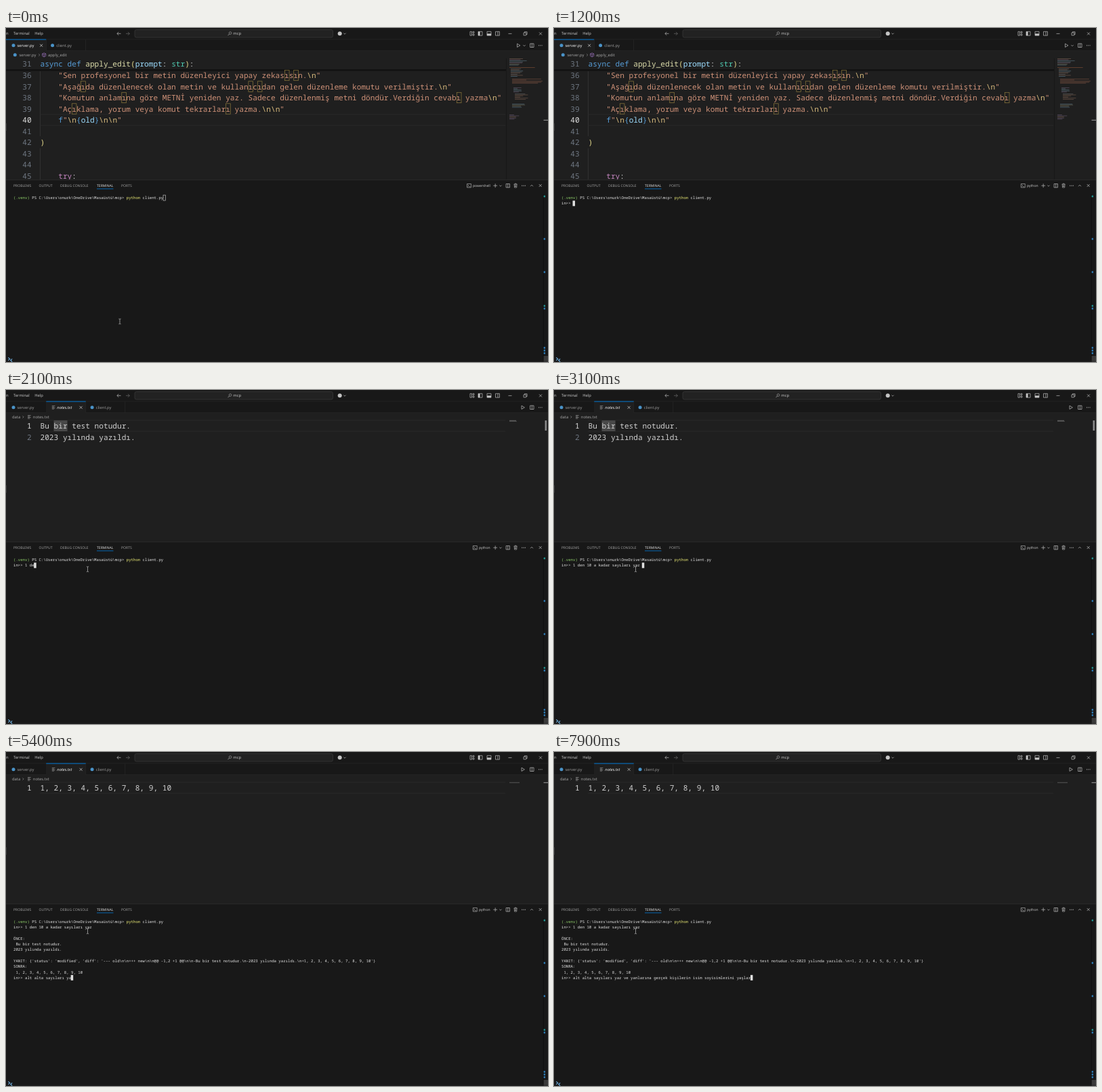
Animation of 800x494 px, one loop 8 s. Source, as an HTML page:

```html
<!DOCTYPE html>
<html lang="tr">
<head>
<meta charset="utf-8">
<title>Editor session</title>
<style>
html, body { margin: 0; width: 100%; height: 100%; overflow: hidden; background: #181818; }
svg { display: block; width: 800px; height: 494px; }
text { white-space: pre; text-rendering: geometricPrecision; }
.code { font: 11.14px "Noto Sans Mono", "DejaVu Sans Mono", monospace; }
.term { font: 500 5.68px "Noto Sans Mono", "DejaVu Sans Mono", monospace; fill: #e2e2e2; }
.ui { font: 5.85px "Open Sans", "Noto Sans", sans-serif; fill: #cccccc; }
.cap { font: 5.08px "Open Sans", "Noto Sans", sans-serif; fill: #a6a6a6; }
</style>
</head>
<body>
<svg id="stage" viewBox="0 0 800 494"></svg>
<script>
const LOOP = 8000;
const CODE_W = 6.683, CODE_X = 50.5, CODE_ROW = 16.5;
const TERM_W = 3.408, TERM_X = 11, TERM_ROW = 8.27;
const STR = '#ce9178', ESC = '#d7ba7d', KEY = '#569cd6', VAR = '#9cdcfe',
      BRACKET = '#e3d98a', PLAIN = '#d0d0d0', DIM = '#6e7681', PY = '#4a93c8';

const stage = document.getElementById('stage');

function el(tag, attrs, parent = stage) {
  const node = document.createElementNS('http://www.w3.org/2000/svg', tag);
  for (const k in attrs) node.setAttribute(k, attrs[k]);
  return parent.appendChild(node);
}
const group = (parent = stage) => el('g', {}, parent);
const rect = (x, y, width, height, fill, parent, more) =>
  el('rect', { x, y, width, height, fill, ...more }, parent);
const line = (d, parent, stroke = '#bdbdbd', w = 0.7) =>
  el('path', { d, stroke, fill: 'none', 'stroke-width': w }, parent);
const dot = (x, y, r, fill, parent) => el('circle', { cx: x, cy: y, r, fill }, parent);

// runs: a string or a list of [text, colour]
function text(cls, x, y, runs, parent, more) {
  const node = el('text', { class: cls, x, y, ...more }, parent);
  if (typeof runs === 'string') node.textContent = runs;
  else for (const [s, fill] of runs) el('tspan', { fill }, node).textContent = s;
  return node;
}
const show = (node, on) => { node.style.display = on ? '' : 'none'; };

const icon = {
  close: (x, y, p, c) => line(`M${x-2} ${y-2}l4 4m0-4l-4 4`, p, c),
  down: (x, y, p) => line(`M${x-1.6} ${y-.8}l1.6 1.6l1.6-1.6`, p),
  right: (x, y, p) => line(`M${x-.8} ${y-1.6}l1.6 1.6l-1.6 1.6`, p, '#909090'),
  dots: (x, y, p) => [-2.3, 0, 2.3].forEach(d => dot(x + d, y, .6, '#c4c4c4', p)),
  split: (x, y, p) => line(`M${x-2.7} ${y-2.7}h5.4v5.4h-5.4zM${x} ${y-2.7}v5.4`, p),
  play: (x, y, p) => line(`M${x-2} ${y-2.6}l4.4 2.6l-4.4 2.6z`, p),
  list: (x, y, p) => line(`M${x-2.3} ${y-2.2}h4.6m-4.6 1.5h3.3m-3.3 1.5h4.6m-4.6 1.5h3.3`, p, '#b0b0b0', .6),
  shell: (x, y, p) => line(`M${x-3} ${y-2.7}h6v5.4h-6zM${x-1.8} ${y-1.3}l1.4 1.3l-1.4 1.3M${x} ${y+1.5}h1.8`, p, '#c4c4c4', .6)
};

function titleBar() {
  text('ui', 0, 10.4, 'n');
  text('ui', 11, 10.4, 'Terminal');
  text('ui', 42.3, 10.4, 'Help');
  line('M169.5 8.3h-5.6m2.4-2.4l-2.4 2.4l2.4 2.4');
  line('M177 8.3h5.4m-2.4-2.4l2.4 2.4l-2.4 2.4', stage, '#6a6a6a');
  rect(190, 2.5, 292.5, 11.5, '#222222', stage, { rx: 2.5, stroke: '#3c3c3c', 'stroke-width': .7 });
  el('circle', { cx: 331, cy: 7.5, r: 1.8, fill: 'none', stroke: '#b0b0b0', 'stroke-width': .6 });
  line('M329.7 8.9l-2.2 2.2');
  text('ui', 335.3, 10.4, 'mcp');
  dot(492.7, 8.2, 3, '#c4c4c4');
  icon.down(500, 8.4);
  line('M685 5.3h2.4v5.8h-2.4zM689 5.3h2v2h-2zM689 9h2v2h-2z');
  for (const x of [697, 710, 722.5]) line(`M${x} 5.3h6v5.8h-6z`);
  rect(697, 5.3, 2.6, 5.8, '#c4c4c4');
  rect(710, 8.3, 6, 2.8, '#c4c4c4');
  line('M726 5.3v5.8');
  line('M741.5 8.4h5');
  line('M764 7h3.8v3.8h-3.8zM765.3 7v-1.3h3.8v3.8h-1.3');
  icon.close(789, 8.4);
}

function tab(x, w, name, active, parent) {
  if (active) {
    rect(x, 17, w, 16.7, '#1f1f1f', parent);
    rect(x, 16.5, w, 1, '#0078d4', parent);
    icon.close(x + w - 7.2, 25.8, parent, '#d8d8d8');
  }
  rect(x + w - .3, 17.5, .6, 16, '#2b2b2b', parent);
  const txt = name === 'notes.txt', ix = x + (x ? 9.3 : 11);
  if (txt) icon.list(ix + 1.5, 25.8, parent);
  else dot(ix, 25.8, 2.5, PY, parent);
  text('ui', x + (x ? 15 : 16.5) + (txt ? 1 : 0), 28, name, parent, {
    style: (active ? 'fill:#fff' : 'fill:#9d9d9d') + (txt ? ';font-style:italic' : '')
  });
}

const lineNo = (n, y, on, parent) =>
  text('code', 37.6, y + 4, String(n), parent, { 'text-anchor': 'end', fill: on ? '#dcdcdc' : DIM });
const currentLine = (y, parent) =>
  line(`M50 ${y-8.1}H737M50 ${y+8.1}H737`, parent, '#2c2c2c', .8);
const escapes = (s, fill) =>
  s.split(/(\\n)/).filter(Boolean).map(p => [p, p === '\\n' ? ESC : fill]);

function minimap(parent) {
  let seed = 11;
  const rnd = () => (seed = seed * 16807 % 2147483647) / 2147483647;
  // first y, rows, indent, widest row, colours
  const bands = [
    [45, 1, 0, 50, ['#94705f']],
    [46.6, 6, 0, 28, ['#8a6a80', '#6f8f9f', '#8c8c70']],
    [58, 1, 0, 50, ['#a8633f']],
    [60, 8, 2, 24, ['#7d7d7d', '#6a8fa5', '#94705f']],
    [75, 5, 4, 46, ['#a0674f', '#97604a']],
    [88, 5, 6, 12, ['#7f6a88', '#6f8f9f']],
    [97, 6, 8, 20, ['#7d7d7d', '#8c6a58']],
    [112, 4, 4, 20, ['#6a8fa5', '#8c8c70']],
    [128, 5, 0, 16, ['#7f6a88', '#94705f']]
  ];
  for (const [y, rows, indent, max, colours] of bands)
    for (let i = 0; i < rows; i++)
      rect(743 + indent, y + i * 1.6, max * (.4 + .6 * rnd()), .7,
        colours[Math.floor(rnd() * colours.length)], parent, { opacity: .65 });
}

function codeView() {
  const g = group();
  tab(0, 59.3, 'server.py', true, g);
  tab(59.3, 58, 'client.py', false, g);
  icon.play(756.5, 25.8, g);
  icon.down(765, 26, g);
  dot(13.3, 39.8, 2.5, PY, g);
  text('ui', 19.5, 42, 'server.py', g, { style: 'fill:#a9a9a9' });
  icon.right(49, 39.9, g);
  line('M53.6 38.2l2.6-1.3l2.6 1.3v3.2l-2.6 1.3l-2.6-1.3zM53.6 38.2l2.6 1.3l2.6-1.3M56.2 39.5v3.2', g, '#b180d7', .6);
  text('ui', 62, 42, 'apply_edit', g, { style: 'fill:#a9a9a9' });

  const rowY = n => 70 + (n - 36) * CODE_ROW;
  line('M50.5 63V160M50.5 178V224', g, '#3a3a3a', .7);
  rect(0, 61.2, 738, 1.6, '#101010', g);
  rect(0, 62.8, 738, 1.2, '#181818', g);
  currentLine(rowY(40), g);
  lineNo(31, 53, false, g);
  for (let n = 36; n <= 45; n++) lineNo(n, rowY(n), n === 40, g);

  text('code', CODE_X, 57, [
    ['async def ', KEY], ['apply_edit', '#dcdcaa'], ['(', BRACKET], ['prompt', VAR],
    [': ', PLAIN], ['str', '#4ec9b0'], [')', BRACKET], [':', PLAIN]
  ], g);

  const inner = CODE_X + 4 * CODE_W;
  [
    '"Sen profesyonel bir metin düzenleyici yapay zekasısın.\\n"',
    '"Aşağıda düzenlenecek olan metin ve kullanıcıdan gelen düzenleme komutu verilmiştir.\\n"',
    '"Komutun anlamına göre METNİ yeniden yaz. Sadece düzenlenmiş metni döndür.Verdiğin cevabı yazma\\n"',
    '"Açıklama, yorum veya komut tekrarları yazma.\\n\\n"'
  ].forEach((s, i) => {
    const y = rowY(36 + i);
    text('code', inner, y + 4, escapes(s, STR), g);
    [...s].forEach((c, col) => {
      if (c === 'ı')
        rect(inner + col * CODE_W, y - 7.7, CODE_W, 15.4, 'none', g, { stroke: '#8f7a3c', 'stroke-width': .7 });
    });
  });
  text('code', inner, rowY(40) + 4, [
    ['f', KEY], ['"', STR], ['\\n', ESC], ['{', KEY], ['old', VAR], ['}', KEY],
    ...escapes('\\n\\n"', STR)
  ], g);
  text('code', CODE_X, rowY(42) + 4, [[')', BRACKET]], g);
  text('code', inner, rowY(45) + 4, [['try', '#c586c0'], [':', PLAIN]], g);

  minimap(g);
  rect(738, 45, .7, 179, '#161616', g);
  rect(793.5, 135.8, 6.5, 1, '#a0a0a0', g);
  return g;
}

function notesView() {
  const g = group();
  tab(0, 59.3, 'server.py', false, g);
  tab(59.3, 58.5, 'notes.txt', true, g);
  tab(117.8, 58, 'client.py', false, g);
  icon.play(763, 25.8, g);
  text('ui', 9, 42, 'data', g, { style: 'fill:#a9a9a9' });
  icon.right(25.3, 39.9, g);
  icon.list(34.3, 39.8, g);
  text('ui', 39.8, 42, 'notes.txt', g, { style: 'fill:#a9a9a9' });
  currentLine(53, g);
  lineNo(1, 53, true, g);

  const before = group(g), after = group(g);
  rect(CODE_X + 3 * CODE_W, 45, 3 * CODE_W, 16, '#484848', before);
  text('code', CODE_X, 57, 'Bu bir test notudur.', before, { fill: PLAIN });
  lineNo(2, 69.5, false, before);
  text('code', CODE_X, 73.5, '2023 yılında yazıldı.', before, { fill: PLAIN });
  rect(743, 44.8, 10, .9, '#777777', before);
  rect(743, 46.3, 11, .7, '#555555', before);
  rect(795.5, 45, 2.6, 15, '#8a8a8a', before);
  text('code', CODE_X, 57, '1, 2, 3, 4, 5, 6, 7, 8, 9, 10', after, { fill: PLAIN });
  rect(743, 44.8, 15, .8, '#666666', after);
  rect(793.5, 44.8, 6.5, 1, '#a0a0a0', after);
  return { g, before, after };
}

function panel() {
  rect(0, 224.3, 800, 270, '#181818');
  rect(0, 224.3, 800, .9, '#2e2e2e');
  for (const [x, name] of [[11, 'PROBLEMS'], [48.5, 'OUTPUT'], [80, 'DEBUG CONSOLE'], [134, 'TERMINAL'], [170, 'PORTS']])
    text('cap', x, 235.2, name, stage, name === 'TERMINAL' ? { style: 'fill:#e6e6e6' } : {});
  rect(134, 237.5, 24.5, .8, '#0078d4');
  line('M719.3 233.2h5.8M722.2 230.3v5.8');
  icon.down(730, 233.4);
  icon.split(740.8, 233.2);
  line('M749.5 231.2h5.2M751 231.2v-1h2.2v1M750.2 231.4l.3 4.6h3.2l.3-4.6M751.5 232.5v2.5M752.7 232.5v2.5', stage, '#c4c4c4', .6);
  icon.dots(764, 233.2);
  line('M774 234.2l2-2l2 2');
  icon.close(788.7, 233);
  rect(792.8, 246, .8, 248, '#0c0c0c');
  for (const y of [249, 312, 361, 411, 415, 473, 477, 481])
    rect(793.6, y - 1.3, 2.4, 2.6, y === 249 || y === 411 ? '#22938e' : '#2f7bb4');
  rect(793.6, 485, 6.4, 9, '#3a3a3a');
  rect(0, 492.6, 800, .7, '#242424');
  line('M3.2 487.4l2.6 2.1l-2.6 2.1M9.2 489.4l-2.5 2.1l2.5 2.1', stage, '#6fb0e0', 1.1);
}

rect(0, 0, 800, 494, '#181818');
rect(0, 33.6, 800, 191, '#1f1f1f');
rect(0, 33.2, 800, .6, '#2b2b2b');
rect(0, 16.6, 800, .6, '#2b2b2b');
titleBar();
const code = codeView();
const notes = notesView();
icon.split(776.3, 25.8);
icon.dots(788.7, 25.8);
rect(0, 141, .8, 11, '#3c3c3c');
panel();

const shells = ['powershell', 'python'].map((name, i) => {
  const g = group();
  icon.shell(i ? 692.3 : 683.5, 233.2, g);
  text('cap', i ? 698 : 689, 235, name, g, { style: 'fill:#d0d0d0' });
  return g;
});

const termY = row => 253.1 + row * TERM_ROW;
text('term', TERM_X, termY(0), [
  ['(.venv) ', '#8fd06a'], ['PS C:\\Users\\onurk\\OneDrive\\Masaüstü\\mcp> ', '#e2e2e2'],
  ['python', '#f4f47a'], [' client.py', '#e2e2e2']
]);
const rows = Array.from({ length: 11 }, (_, i) => text('term', TERM_X, termY(i), ''));
const block = rect(0, 0, 3.5, 8, '#e0e0e0');
const pointer = line('M-1.6-3.8h1.1l.5.5l.5-.5H1.6M0-3.3V3.3M-1.6 3.8h1.1l.5-.5l.5.5H1.6', stage, '#cccccc', .65);

const PROMPT = 'in>> ';
const FIRST = '1 den 10 a kadar sayıları yaz ';
const SECOND = 'alt alta sayıları yaz ve yanlarına gerçek kişilerin isim soyisimlerini yaşlar';
const ASKED = { 3: 'ÖNCE:', 4: ' Bu bir test notudur.', 5: '2023 yılında yazıldı.' };
const REPLY = {
  7: "YANIT: {'status': 'modified', 'diff': '--- old\\n\\n+++ new\\n\\n@@ -1,2 +1 @@\\n\\n-Bu bir test notudur.\\n-2023 yılında yazıldı.\\n+1, 2, 3, 4, 5, 6, 7, 8, 9, 10'}",
  8: 'SONRA:',
  9: ' 1, 2, 3, 4, 5, 6, 7, 8, 9, 10'
};
const ENTER = 300, LABEL = 500, READY = 1000, OPEN = 1400, FOCUS = 1800,
      SENT = 3300, ECHO = 3500, DONE = 3800;
const typeFirst = [[1900, 0], [2000, 2], [2100, 4], [3100, 30]];
const typeSecond = [[4400, 0], [4500, 2], [4700, 4], [6400, 43], [7300, 68], [7900, 77]];
const mouseX = [[600, 168], [1100, -10], [1500, -10], [1800, 120.5]];
const mouseY = [[600, 434], [1100, 300], [1500, 90], [1800, 265]];

function at(keys, t) {
  if (t <= keys[0][0]) return keys[0][1];
  for (let i = 1; i < keys.length; i++) {
    const [t0, a] = keys[i - 1], [t1, b] = keys[i];
    if (t < t1) return a + (b - a) * (t - t0) / (t1 - t0);
  }
  return keys[keys.length - 1][1];
}
const typed = (s, keys, t) => PROMPT + s.slice(0, Math.floor(at(keys, t) + 1e-6));

function draw(t) {
  const open = t >= OPEN, done = t >= DONE;
  show(code, !open);
  show(notes.g, open);
  show(notes.before, !done);
  show(notes.after, done);
  show(shells[0], t < LABEL);
  show(shells[1], t >= LABEL);

  const lines = {};
  if (t >= READY) lines[1] = typed(FIRST, typeFirst, t);
  if (t >= ECHO) Object.assign(lines, ASKED);
  if (done) Object.assign(lines, REPLY, { 10: typed(SECOND, typeSecond, t) });
  rows.forEach((node, i) => {
    const s = lines[i] || '';
    if (node.textContent !== s) node.textContent = s;
  });

  const row = t < ENTER ? 0 : t < SENT ? 1 : t < ECHO ? 2 : done ? 10 : 6;
  const col = row ? (lines[row] || '').length : 65;
  const hollow = t < 100 || (open && t < FOCUS);
  block.setAttribute('x', TERM_X + col * TERM_W - .5);
  block.setAttribute('y', termY(row) - 6);
  block.setAttribute('fill', hollow ? 'none' : '#e0e0e0');
  block.setAttribute('stroke', hollow ? '#d4d4d4' : 'none');
  block.setAttribute('stroke-width', .6);

  pointer.setAttribute('transform', `translate(${at(mouseX, t)} ${at(mouseY, t)})`);
}

const start = performance.now();
function tick() {
  const t = (performance.now() - start) % LOOP;
  draw(Math.floor(t / 100) * 100);
  requestAnimationFrame(tick);
}
tick();
</script>
</body>
</html>
```
